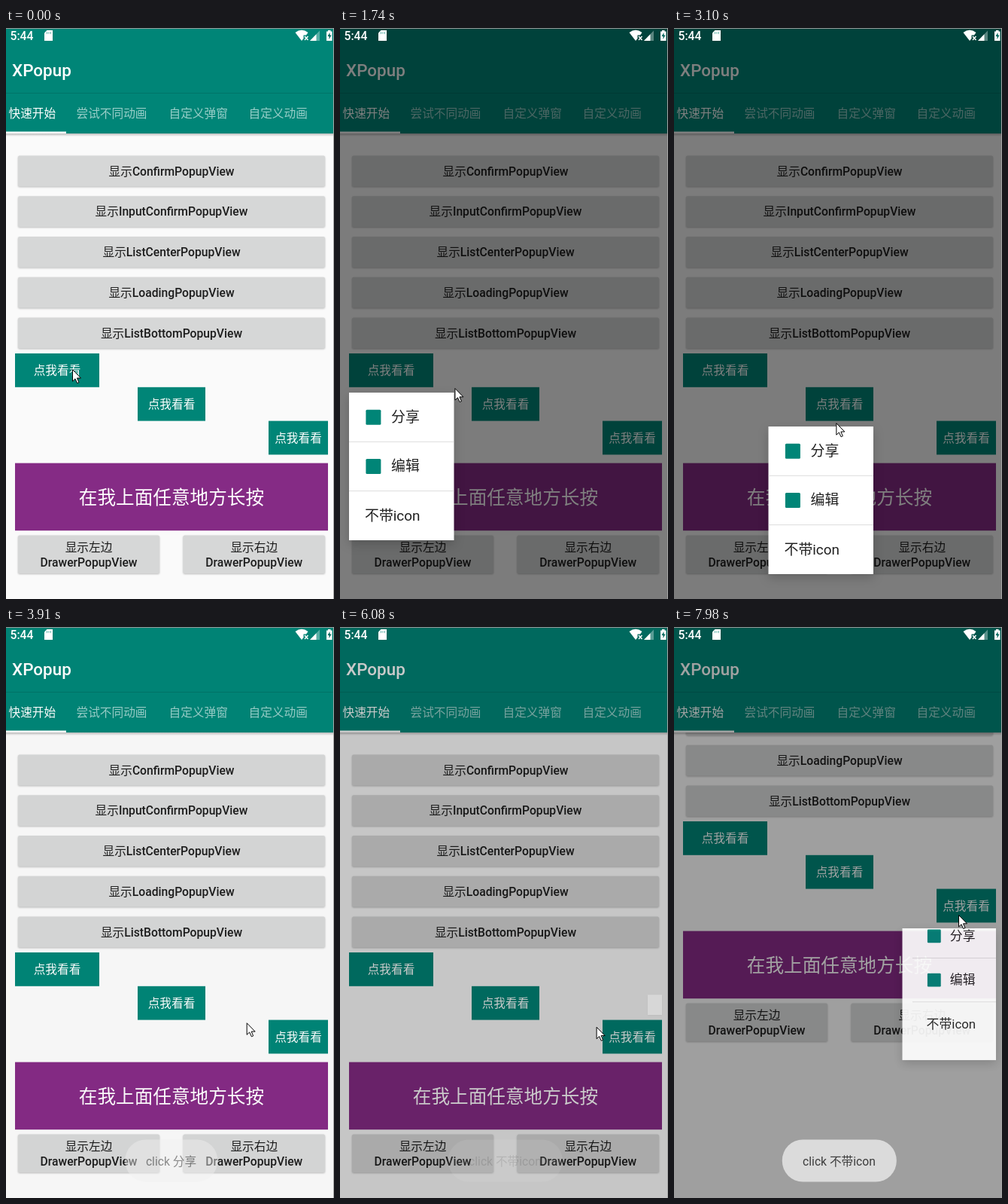
An HTML page that plays this animation: 436x758 px, repeating every 8 s.

```html
<!DOCTYPE html>
<html lang="zh-CN">
<head>
<meta charset="utf-8">
<title>XPopup</title>
<style>
  html, body { margin: 0; width: 100%; height: 100%; overflow: hidden; background: #fafafa; }
  #stage { display: block; width: 100vw; height: 100vh; }
  text { font: 400 15.68px Roboto, "Noto Sans CJK SC", "Noto Sans CJK", sans-serif; }
  .medium { font-weight: 500; }
  .cjk { font-weight: 400; }
  .raised { filter: drop-shadow(0 1px 1px rgba(0, 0, 0, .25)); }
  .card { filter: drop-shadow(0 5px 7px rgba(0, 0, 0, .18)); }
</style>
</head>
<body>
<svg id="stage" viewBox="0 0 436 758" preserveAspectRatio="none">
  <defs>
    <linearGradient id="fade" x2="0" y2="1">
      <stop stop-opacity=".25"/><stop offset="1" stop-opacity="0"/>
    </linearGradient>
  </defs>
  <rect width="436" height="758" fill="#fafafa"/>
  <g id="page"></g>
  <g id="bar"></g>
  <rect id="dim" width="436" height="758"/>
  <g id="status" fill="#fff">
    <path d="M54.500 3H62V17H51V6.500Z"/>
    <path d="M54.500 5v3M57 5v3M59.500 5v3" stroke="#008577" stroke-opacity=".6"/>
    <path d="M384.500 6Q393 -.5 401.500 6L399 9.500H395.500V14L393 17Z"/>
    <path d="M397 11l4.500 5M401.500 11l-4.500 5" stroke="#fff" stroke-width="1.500"/>
    <path d="M404 17L417 3.500V17Z" opacity=".35"/>
    <path d="M404 17L412.500 8.200V17Z"/>
    <path d="M426 4.500h2V3h3.500v1.500h2V17H426Z"/>
    <path d="M430.500 6l-3 5h2v4l3-5.500h-2Z" fill="#00665b"/>
  </g>
  <g id="popup">
    <rect class="card" id="card" fill="#fff"/>
    <svg id="window"><g id="items"></g></svg>
  </g>
  <g id="toast"><rect y="680.500" height="56" rx="27.500" fill="#efefef" fill-opacity=".75"/><text x="219.500" y="714.500" text-anchor="middle" fill-opacity=".73"></text></g>
  <path d="M0 .5H436" stroke="#9a9a9a"/>
  <path d="M435.500 0V758" stroke="#a4a4a4"/>
  <path id="cursor" d="M.5 .5V16L4 12.700L6.700 18.500L9 17.500L6.500 11.800H11.500Z" fill="#fff" stroke="#000"/>
</svg>
<script>
const $ = id => document.getElementById(id);
const LOOP = 8000, ANIM = 360, DIM_LEAD = 38, TEAL = '#008577';
const CARD_W = 139.5, CARD_H = 196, ROW = 65.3;
const DP = 1.12; // stage pixels per layout unit

// ---- static drawing ----
const rect = (x, y, w, h, fill, extra = '') =>
  `<rect x="${x}" y="${y}" width="${w}" height="${h}" fill="${fill}" ${extra}/>`;

function label(x, y, str, { size = 14 * DP, fill = '#fff', anchor = 'middle', medium = false, alpha = 1 } = {}) {
  const runs = str.replace(/[\u4e00-\u9fff]+/g, '<tspan class="cjk">$&</tspan>');
  return `<text x="${x}" y="${y}" text-anchor="${anchor}" fill="${fill}" fill-opacity="${alpha}"
    class="${medium ? 'medium' : ''}" style="font-size:${size}px">${runs}</text>`;
}

const greyButton = (x, y, w, h, lines) =>
  rect(x, y, w, h, '#d6d7d7', 'rx="2" class="raised"') +
  lines.map((s, i) => label(x + w / 2, y + h / 2 + 5.7 + 20 * (i - (lines.length - 1) / 2), s,
    { fill: '#000', alpha: .87, medium: true })).join('');

const tealButton = (x, row, w) => {
  const h = 40 * DP, y = 432 + row * h;
  return rect(x, y, w, h, TEAL) + label(x + w / 2, y + 28, '点我看看');
};

$('page').innerHTML =
  ['Confirm', 'InputConfirm', 'ListCenter', 'Loading', 'ListBottom']
    .map((name, i) => greyButton(16, 169.5 + 48 * DP * i, 408, 36 * DP + .5, [`显示${name}PopupView`])).join('') +
  tealButton(12, 0, 112) + tealButton(175, 1, 90) + tealButton(349, 2, 79) +
  rect(12, 577.6, 416, 80 * DP, '#852b85') +
  label(220, 632, '在我上面任意地方长按', { size: 22 * DP }) +
  greyButton(16, 673.6, 188, 50.4, ['显示左边', 'DrawerPopupView']) +
  greyButton(235.5, 673.6, 188.5, 50.4, ['显示右边', 'DrawerPopupView']);

const left = { anchor: 'start' };
$('bar').innerHTML =
  rect(0, 140, 436, 4, 'url(#fade)') +
  rect(0, 0, 436, 140, TEAL) +
  rect(0, 86, 436, 1, '#000', 'opacity=".12"') +
  label(8, 64, 'XPopup', { ...left, size: 20 * DP, medium: true }) +
  [[4, '快速开始'], [94, '尝试不同动画'], [217, '自定义弹窗'], [323, '自定义动画']]
    .map(([x, s], i) => label(x - .5, 119, s, { ...left, alpha: i ? .6 : 1 })).join('') +
  rect(0, 137.5, 80, 2.5, '#fff');

$('status').insertAdjacentHTML('beforeend', label(5.5, 16, '5:44', { ...left, medium: true }));

$('items').innerHTML = ['分享', '编辑', '不带icon'].map((s, i) => {
  const mid = ROW * (i + .5), icon = i < 2;
  return (icon ? rect(22.4, mid - 10, 20, 20, TEAL, 'rx="1.5"') : '') +
    label(icon ? 56 : 21, mid + 6.5, s, { ...left, size: 18.9, fill: '#222' }) +
    (icon ? rect(0, ROW * (i + 1) - .5, CARD_W, 1, '#ddd') : '');
}).join('');

// ---- timeline ----
// screen refreshes: first, last, count
const bursts = [[740, 1180, 6], [1650, 2280, 8], [2650, 3280, 8], [3560, 4270, 9], [4830, 5450, 8],
  [5630, 6430, 10], [6520, 7240, 9], [7340, 7430, 2], [7800, 7980, 3]];
// anchor point, pivot (0 = left/top, 1 = right/bottom), opening and closing times
const popups = [
  { x: 12, y: 484, px: 0, py: 0, open: 752, close: 1900 },
  { x: 265, y: 529, px: 1, py: 0, open: 2690, close: 3565 },
  { x: 428, y: 515, px: 1, py: 1, open: 4850, close: 5864 },
  { x: 428, y: 400, px: 1, py: 0, open: 7756, close: Infinity }
];
const toasts = [
  { text: 'click 分享', w: 123, from: 3735, to: 5600 },
  { text: 'click 不带icon', w: 152, from: 6040, to: Infinity }
];
const pointer = [[0, 88, 453], [1560, 88, 453], [1870, 199, 496], [2950, 199, 496], [3280, 235, 558],
  [3600, 235, 558], [3910, 319, 525], [4270, 368, 543], [5010, 368, 543], [5450, 362, 485],
  [5880, 362, 485], [6080, 340, 532], [6430, 340, 545], [6520, 340, 545], [7060, 338, 374],
  [7240, 367, 385], [7340, 373, 384], [7430, 378, 382]];
const scroll = [[6520, 0], [7060, 167], [7240, 174]];

const clamp = v => Math.min(1, Math.max(0, v));

function held(t) {
  const burst = bursts.filter(b => b[0] <= t).pop();
  if (!burst) return 0;
  const [first, last, count] = burst, step = (last - first) / (count - 1);
  return first + step * Math.min(count - 1, Math.floor((t - first) / step + .1));
}

function track(keys, t) {
  const i = keys.findIndex(k => k[0] > t);
  if (i < 0) return keys[keys.length - 1].slice(1);
  if (i === 0) return keys[0].slice(1);
  const a = keys[i - 1], b = keys[i], u = (t - a[0]) / (b[0] - a[0]);
  return a.slice(1).map((v, n) => v + (b[n + 1] - v) * u);
}

// cubic-bezier(.4, 0, .2, 1)
function fastOutSlowIn(x) {
  let lo = 0, hi = 1;
  for (let i = 0; i < 24; i++) {
    const s = (lo + hi) / 2, r = 1 - s;
    if (1.2 * s * r * r + .6 * s * s * r + s * s * s < x) lo = s; else hi = s;
  }
  return lo * lo * (3 - 2 * lo);
}

function drawPopup(t) {
  const p = popups.find(q => t >= q.open - DIM_LEAD && t < q.close + ANIM);
  $('popup').style.display = p ? '' : 'none';
  $('dim').setAttribute('opacity', 0);
  if (!p) return;
  const closing = t >= p.close;
  const grown = closing ? 1 - fastOutSlowIn((t - p.close) / ANIM) : fastOutSlowIn(clamp((t - p.open) / ANIM));
  const shade = closing ? 1 - (t - p.close) / ANIM : clamp((t - p.open + DIM_LEAD) / ANIM);
  $('dim').setAttribute('opacity', .5 * shade);
  if (grown < .002) { $('popup').style.display = 'none'; return; }
  $('popup').setAttribute('opacity', .2 + .8 * grown);
  $('popup').setAttribute('transform',
    `translate(${p.x} ${p.y}) scale(${grown}) translate(${-p.px * CARD_W} ${-p.py * CARD_H})`);
  const shift = (pivot, size) => (2 * pivot - 1) * (1 - grown) * size;
  $('items').setAttribute('transform', `translate(${shift(p.px, CARD_W)} ${shift(p.py, CARD_H)})`);
}

function drawToast(t) {
  const toast = toasts.find(q => t >= q.from && t < q.to + 400);
  $('toast').style.display = toast ? '' : 'none';
  if (!toast) return;
  const shown = 1 - (1 - clamp((t - toast.from) / 500)) ** 2;
  $('toast').setAttribute('opacity', shown * (1 - clamp((t - toast.to) / 400)));
  const [pill, text] = $('toast').children;
  pill.setAttribute('x', 219.8 - toast.w / 2);
  pill.setAttribute('width', toast.w);
  if (text.textContent !== toast.text) text.textContent = toast.text;
}

function draw(time) {
  const t = held(time);
  $('page').setAttribute('transform', `translate(0 ${-track(scroll, t)[0]})`);
  $('cursor').setAttribute('transform', `translate(${track(pointer, t).join(' ')})`);
  drawPopup(t);
  drawToast(t);
}

for (const id of ['card', 'window']) {
  $(id).setAttribute('width', CARD_W);
  $(id).setAttribute('height', CARD_H);
}

const start = performance.now();
function tick() {
  draw((performance.now() - start) % LOOP);
  requestAnimationFrame(tick);
}
tick();
</script>
</body>
</html>
```
